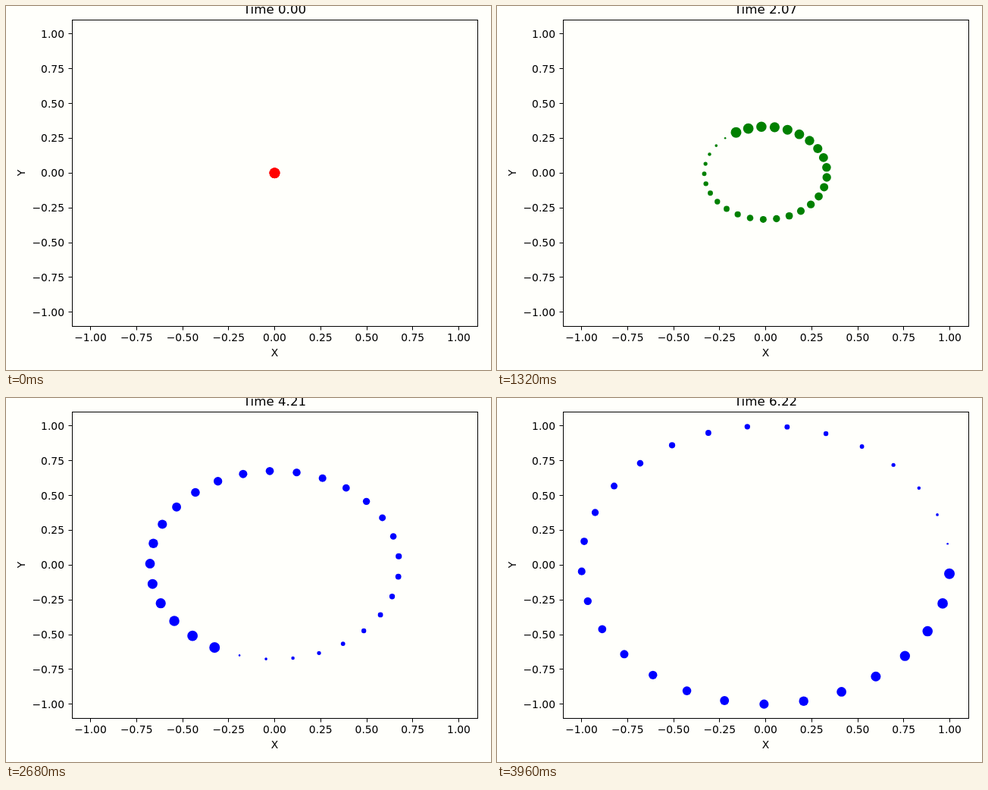
Recreate the animation shown at these times as an HTML page with a canvas. Size 640x480 px, loop 4000 ms.

```html
<!DOCTYPE html>
<html lang="en">
<head>
<meta charset="utf-8">
<title>Expanding ring</title>
<style>
  html, body { margin: 0; width: 100%; height: 100%; overflow: hidden; background: #fffffb; }
  canvas { display: block; }
</style>
</head>
<body>
<canvas id="stage" width="640" height="480"></canvas>
<script>
const ctx = document.getElementById('stage').getContext('2d');
const TAU = Math.PI * 2;
const STEP_MS = 40, STEPS = 100, DOTS = 29;
const MAX_RADIUS = 7;
const plot = { left: 87.5, right: 622.5, top: 18.5, bottom: 422.5 };
const toX = x => 354.5 + x * 243;
const toY = y => 220.3 - y * 183.4;

function line(x1, y1, x2, y2) {
  ctx.beginPath();
  ctx.moveTo(x1, y1);
  ctx.lineTo(x2, y2);
  ctx.stroke();
}

function label(text, x, y, align = 'center', size = 13.89) {
  ctx.font = `${size}px "DejaVu Sans", sans-serif`;
  ctx.textAlign = align;
  ctx.fillText(text, x, y);
}

function drawAxes() {
  ctx.fillStyle = ctx.strokeStyle = '#000';
  ctx.lineWidth = 1;
  ctx.strokeRect(plot.left, plot.top, plot.right - plot.left, plot.bottom - plot.top);
  for (let i = -4; i <= 4; i++) {
    const value = i / 4;
    const text = value.toFixed(2).replace('-', '\u2212');
    const x = Math.floor(toX(value)) + 0.5;
    const y = Math.floor(toY(value)) + 0.5;
    line(x, plot.bottom, x, plot.bottom + 5);
    line(plot.left - 5, y, plot.left, y);
    label(text, toX(value), 442);
    label(text, 77, Math.round(toY(value) + 5), 'right');
  }
  label('X', 354.5, 462);
  ctx.save();
  ctx.translate(25, 220);
  ctx.rotate(-TAU / 4);
  label('Y', 0, 0);
  ctx.restore();
}

function drawRing(step, angle) {
  const radius = step / (STEPS - 1);
  ctx.fillStyle = step < 33 ? '#f00' : step < 66 ? '#008000' : '#00f';
  // Dot area grows linearly up to the leading dot.
  for (let i = 1; i <= DOTS; i++) {
    const a = angle + i * TAU / DOTS;
    ctx.beginPath();
    ctx.arc(toX(radius * Math.cos(a)), toY(radius * Math.sin(a)),
      MAX_RADIUS * Math.sqrt(i / DOTS), 0, TAU);
    ctx.fill();
  }
}

function draw() {
  const step = Math.floor(performance.now() / STEP_MS) % STEPS;
  const time = step * TAU / STEPS;
  ctx.fillStyle = '#fffffb';
  ctx.fillRect(0, 0, 640, 480);
  drawRing(step, time);
  drawAxes();
  label(`Time ${time.toFixed(2)}`, 354.5, 10, 'center', 16.67);
  requestAnimationFrame(draw);
}
draw();
</script>
</body>
</html>
```
